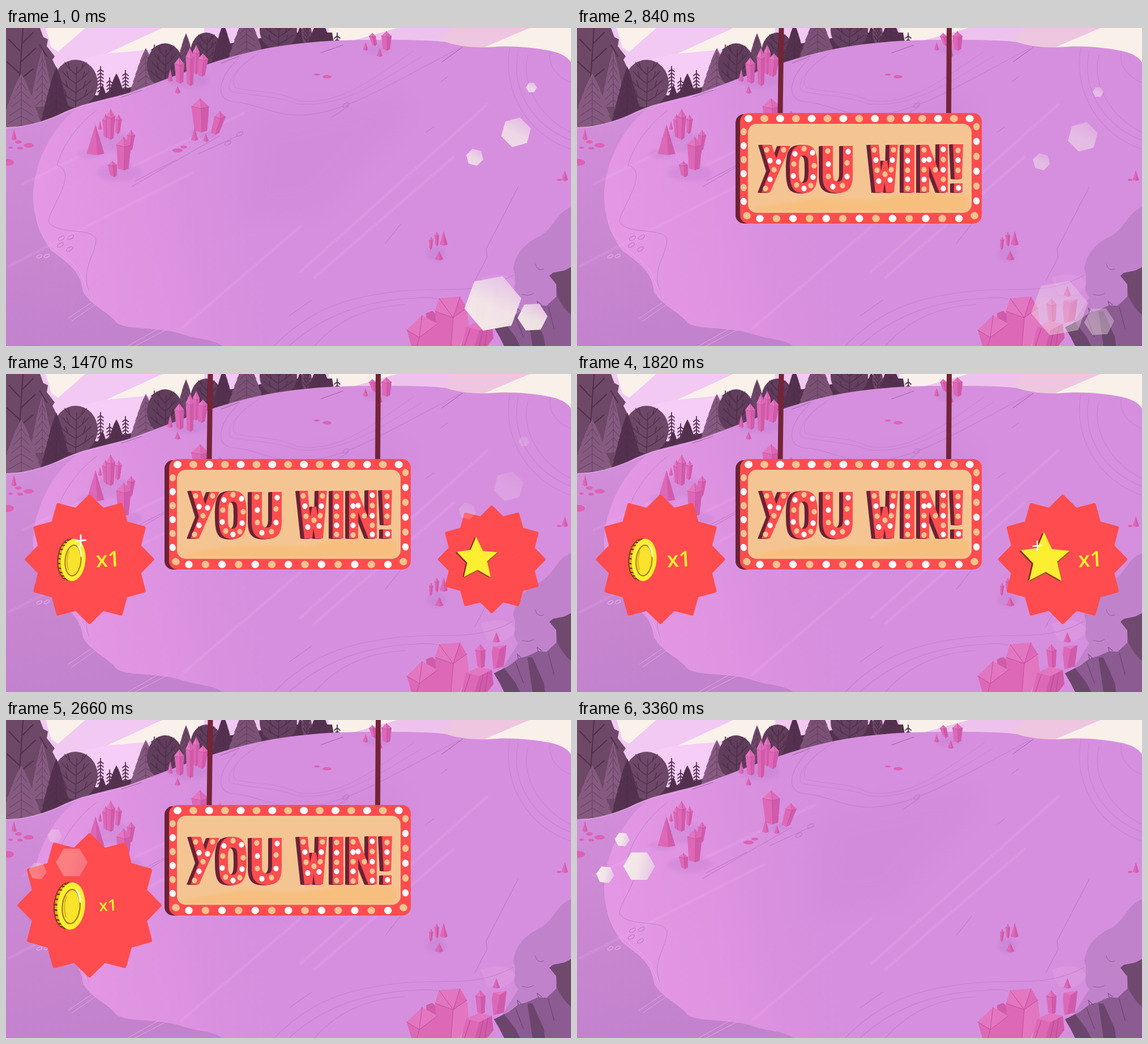
An HTML page for the animation above (3430 ms loop, 998 by 561 pixels).

```html
<!DOCTYPE html>
<html lang="en">
<head>
<meta charset="utf-8">
<title>You win!</title>
<style>
html, body { margin: 0; width: 100%; height: 100%; overflow: hidden; background: #d68fde; }
svg { display: block; width: 100vw; height: 100vh; }
.amount { font: 600 38px "Open Sans", "Noto Sans", sans-serif; fill: #fdee32; text-anchor: middle; }
</style>
</head>
<body>
<svg id="stage" viewBox="0 0 998 561" preserveAspectRatio="none"></svg>
<script>
const LOOP = 3430, STEP = 70;
const RED = '#ff4c4f', WINE = '#6c2236', TAN = '#f3c48f', YELLOW = '#fdee32';
const DARK = '#54324f', MID = '#6d4867', PALE = '#865a80', VEIN = '#4b2a47';
const PINK = '#dd68b7', ROSE = '#d05bab', BLUSH = '#e376c0';

const n = v => Math.round(v * 10) / 10;
const pts = list => list.map(p => n(p[0]) + ',' + n(p[1])).join(' ');
const poly = (list, fill, more = '') =>
  `<polygon points="${Array.isArray(list) ? pts(list) : list}" fill="${fill}" ${more}/>`;
const path = (d, fill, more = '') => `<path d="${d}" fill="${fill}" ${more}/>`;
const line = (d, color, width = 1, alpha = 1) =>
  path(d, 'none', `stroke="${color}" stroke-width="${width}" opacity="${alpha}" stroke-linecap="round" stroke-linejoin="round"`);
const oval = (x, y, rx, ry, fill, more = '') =>
  `<ellipse cx="${n(x)}" cy="${n(y)}" rx="${rx}" ry="${ry}" fill="${fill}" ${more}/>`;
const group = (id, body, more = '') => `<g id="${id}" ${more}>${body}</g>`;

// Scenery
function fir(x, top, w, base, color) {
  const tiers = 7, h = base - top, left = [], right = [];
  let veins = `M${x} ${top + 8}V${base}`;
  for (let i = 1; i <= tiers; i++) {
    const y = top + h * i / tiers, r = w / 2 * (i / tiers) ** .85;
    left.push([x - r, y], [x - r * .92, y - 1]);
    right.push([x + r, y], [x + r * .92, y - 1]);
    if (i > 1) veins += `M${n(x - r * .65)} ${n(y)}L${x} ${n(y - h * .13)}L${n(x + r * .65)} ${n(y)}`;
  }
  return poly([[x, top], ...right, ...left.reverse()], color) + line(veins, VEIN, 1.1, .45);
}

function roundTree(x, y, rx, ry, color) {
  let veins = `M${x} ${y + ry}L${x + 2} ${y - ry * .7}`;
  for (let i = 0; i < 4; i++) {
    const from = y + ry * (.75 - i * .38), reach = rx * (.8 - i * .1);
    for (const s of [-1, 1]) {
      const ex = x + s * reach, ey = from - ry * .5;
      veins += `M${x} ${n(from)}Q${n(x + s * reach * .55)} ${n(from - 8)} ${n(ex)} ${n(ey)}`;
      veins += `M${n(x + s * reach * .5)} ${n(from - ry * .19)}l${n(s * rx * .1)} ${n(-ry * .3)}`;
    }
  }
  return oval(x, y, rx, ry, color) + line(veins, VEIN, 1.5, .7);
}

function sapling(x, top, base) {
  let d = `M${x} ${top}V${base}`;
  for (let y = top + 5; y < base - 10; y += 6) d += `M${x - 5} ${y + 4}L${x} ${y}L${x + 5} ${y + 4}`;
  return line(d, DARK, 1.8);
}

// A column leaning by `lean` with a pointed top
function prism(x, top, base, w, lean = 0) {
  const h = base - top, tx = x + lean, y = top + h * .24, r = w / 2, b = w * .36;
  const low = [x + w * .06, base], mid = [tx + w * .06, y + h * .06];
  return poly([[tx, top], [tx + r, y], [x + b, base - 3], low, [x - b, base - 3], [tx - r, y]], PINK) +
    poly([mid, [tx + r, y], [x + b, base - 3], low], ROSE) +
    poly([[tx, top], mid, [tx - r, y]], BLUSH) +
    line(`M${n(tx - r)} ${n(y)}L${n(mid[0])} ${n(mid[1])}L${n(tx + r)} ${n(y)}M${tx} ${top}L${n(mid[0])} ${n(mid[1])}L${n(low[0])} ${base}`, '#bd4896', .7, .8);
}
const spike = (x, top, base, w) =>
  poly([[x, top], [x + w / 2, base - 2], [x, base], [x - w / 2, base - 2]], PINK) +
  poly([[x, top], [x + w / 2, base - 2], [x + w * .1, base]], ROSE);
const shade = (x, y, rx, ry) => oval(x, y, rx, ry, '#b573c8', 'opacity=".24" filter="url(#soft)"');

function sky() {
  return '<rect width="998" height="200" fill="#f1c9f3"/>' +
    path('M70 0H140L92 42L80 34Z', '#faf1ea') +
    path('M276 0H350V34L262 42L190 58L176 46Z', '#faf1ea') +
    path('M86 66L170 46L300 34L280 90L160 125Z', '#f5cdf6') +
    path('M570 0H692L606 24H570Z', '#faf0ea') +
    path('M692 0H800L770 34H606V24Z', '#edc3ee') +
    path('M790 0H925L830 40L760 32Z', '#eec6e0') +
    path('M925 0H998V64L900 38L840 36Z', '#f9f0e9');
}

function forest() {
  return path('M80 110L130 108L160 119L222 104L262 84L300 62L380 30L450 18L512 8H576L580 30L460 60L250 130L90 170Z', DARK) +
    path('M0 0H60L66 16L74 20L72 32L86 50L82 56L92 76L90 88L100 112L98 165L0 178Z', MID) +
    line('M30 0L24 90M24 40L5 20M26 60L52 36M24 80L2 60M28 28L48 8M26 90L48 72M60 30L72 50', VEIN, 2, .8) +
    fir(64, 38, 46, 140, PALE) + roundTree(123, 98, 39, 42, MID) +
    fir(89, 68, 58, 168, DARK) + fir(27, 80, 84, 184, PALE) +
    sapling(167, 68, 125) + sapling(183, 88, 124) + sapling(211, 75, 120) + sapling(262, 30, 55) +
    fir(170, 100, 22, 130, DARK) + fir(195, 80, 38, 130, DARK) +
    fir(247, 35, 62, 120, PALE) + fir(318, 9, 44, 84, MID) +
    roundTree(281, 66, 32, 39, '#5f3d5b') + roundTree(354, 42, 28, 34, '#5f3d5b') +
    fir(384, -8, 46, 66, DARK) + fir(425, -28, 72, 60, '#7a5175') +
    roundTree(481, 4, 33, 34, '#63405f') + fir(520, -4, 24, 34, DARK) +
    roundTree(531, 10, 9, 18, MID) + fir(554, -18, 50, 34, DARK) + sapling(585, 9, 32);
}

function hill() {
  const top = 'M0 175C40 175 66 167 95 152C140 130 180 126 222 113C300 84 370 55 450 38C510 26 570 21 640 21C700 20 765 22 778 25C795 31 820 35 850 34C890 30 930 34 960 40Q988 45 998 61';
  const lobe = 'M132 137C90 165 62 215 52 260C40 310 55 360 80 393C115 418 132 432 136 465C150 490 180 500 195 520C215 534 270 526 310 540C340 550 365 548 382 561';
  const track = '#b878c8';
  return path(top + 'V561H0Z', '#d68fde') +
    path(lobe + 'H680V23L580 25L450 40L350 70L222 115Z', 'url(#glow)') +
    path(lobe + 'H0V175C45 175 85 158 132 137Z', 'url(#shore)') +
    path('M430 160L690 110L720 150L560 330L410 340Z', '#ca82d6', 'opacity=".28" filter="url(#haze)"') +
    path('M998 316C970 328 972 348 945 366C915 380 900 398 896 425C905 448 890 460 905 475L870 530L890 561H998Z', '#c182cc') +
    path('M838 440Q885 425 900 450Q890 478 850 470Z', '#efb4e9', 'opacity=".18"') +
    line('M520 430L850 135M545 440L790 228M222 245L420 150M30 275L180 202M5 420L330 255M310 530L520 350', '#efb0ec', 5, .17) +
    line('M410 54C375 88 368 125 400 130C440 132 470 154 520 154C600 152 690 92 800 36', track, 1.2, .6) +
    line('M455 40C410 62 394 92 405 105C440 114 480 110 515 128C585 138 640 96 720 40M440 50C405 72 385 100 398 112C440 120 480 120 515 134C590 140 650 102 735 50', track, 1, .5) +
    line('M890 35C876 110 920 188 998 214M905 40C890 110 932 174 998 198M922 48C908 100 945 160 998 184M962 41C955 65 975 88 998 96', track, 1.1, .55) +
    line('M474 561C540 492 610 474 690 465C770 455 830 474 896 436M500 561C560 505 640 480 720 477Q745 474 762 478M545 561C580 520 630 492 705 488', track, 1.2, .6) +
    line('M160 145C115 180 96 220 90 242C130 255 75 320 75 342C92 367 152 350 159 373C158 405 128 425 150 474', track, 1, .75) +
    line('M222 280L325 220L378 190M228 270L300 233M340 222L410 190M828 446L850 404L848 390L905 280M500 508L540 480M670 380L697 346M575 158L605 138M768 95L780 86M742 184L756 174', '#a96abb', 1, .65) +
    line('M55 340C60 380 115 405 130 430Q138 450 152 476M110 512L150 485M116 517L158 488M215 561L270 530M228 561L282 533', '#e9b3ea', 1, .7) +
    line('M0 176C45 176 85 158 132 138C165 130 210 121 255 102', '#e4a8e6', 1.5, .7) +
    line('M556 44L595 30M770 60L806 34M380 62L412 50M204 122L240 110M935 416Q938 430 950 425M912 470Q925 474 932 468', '#84507f', 1, .7) +
    [[98, 371], [114, 369], [96, 383], [112, 390], [392, 203], [413, 187], [600, 136]].map(([x, y]) =>
      oval(x, y, 6, 3, 'none', `stroke="#b272c2" transform="rotate(-30 ${x} ${y})"`)).join('') +
    [[59, 403], [72, 402]].map(([x, y]) =>
      oval(x, y, 5, 2.4, 'none', `stroke="#e9b3ea" transform="rotate(-25 ${x} ${y})"`)).join('');
}

function stump() {
  return path('M998 422L986 428L966 432L960 437L972 452V474L955 490L940 489L920 498L905 502L888 515L862 528L872 545L880 561H998Z', '#8b5b91') +
    path('M998 422L986 428L966 432L960 437L972 452L974 474Q985 496 998 506Z', '#70496f') +
    path('M862 528L880 519L900 545L908 561H880L872 545ZM921 500L930 500L950 545L952 561H930Z', '#6c456c') +
    line('M900 508L914 545M958 492L968 530M905 502L903 494L910 501M940 489L938 482L946 488', '#5b375a', 1.2, .6);
}

function crystals() {
  const puddles = [[22, 201, 6, 3], [40, 207, 9, 4], [8, 211, 4, 2], [25, 212, 5, 2.5], [3, 237, 11, 6],
    [549, 82, 5, 1.8], [567, 86, 8, 3], [303, 216, 9, 3.4], [314, 210, 6, 2.6], [977, 268, 4, 2]];
  return shade(185, 200, 38, 18) + shade(200, 255, 40, 15) + shade(150, 222, 22, 8) + shade(322, 92, 36, 13) +
    shade(350, 186, 24, 8) + shade(760, 398, 17, 14) + shade(655, 38, 22, 8) +
    puddles.map(p => oval(...p, '#dc62b4')).join('') +
    spike(14, 178, 198, 9) + spike(166, 164, 180, 7) +
    prism(177, 152, 194, 12, -1) + prism(197, 153, 187, 11, 2) + prism(184, 143, 197, 16, 1) +
    spike(158, 170, 224, 31) + prism(218, 180, 217, 14, 3) + prism(207, 192, 251, 26, 1) + prism(190, 235, 263, 16, -2) +
    prism(335, 30, 82, 12, 1) + prism(345, 45, 86, 18, 3) + prism(307, 52, 98, 17, -1) + prism(325, 35, 102, 15) +
    spike(290, 72, 95, 9) + spike(303, 102, 116, 10) +
    prism(344, 124, 184, 31, -1) + prism(369, 147, 188, 20, 9) + spike(333, 176, 199, 12) + spike(353, 186, 201, 10) +
    prism(651, 9, 32, 12, -4) + prism(672, 6, 40, 18) + spike(635, 25, 40, 9) + spike(660, 35, 51, 10) +
    spike(987, 251, 270, 11) +
    prism(750, 369, 391, 7, 1) + prism(761, 360, 385, 8) + spike(773, 358, 384, 14) + spike(765, 393, 410, 15) +
    spike(866, 455, 474, 13) + prism(839, 477, 519, 18, -1) +
    poly('860,481 884,478 882,500 879,516 861,521 858,492', PINK) +
    poly('872,485 884,478 879,516 866,519', ROSE) + poly('860,481 884,478 872,485', BLUSH) +
    poly('742,503 753,499 770,515 768,561 745,561', ROSE) +
    poly('765,477 802,474 814,494 817,525 801,561 762,561 758,500', PINK) +
    poly('790,511 814,494 817,525 801,561 786,561', BLUSH) + poly('765,477 802,474 790,511 758,500', BLUSH) +
    line('M758 500L790 511L814 494M790 511L802 474M765 477L790 511L786 561', '#c24f9d', 1) +
    poly('735,507 762,522 766,561 716,561 708,533', PINK) + poly('708,533 730,546 762,522 735,507', BLUSH) +
    line('M708 533L730 546L762 522M730 546L735 507M730 546L726 561', '#c24f9d', 1) +
    poly('813,527 836,517 858,522 861,547 850,561 804,561', PINK) +
    poly('836,533 858,522 861,547 850,561 828,561', ROSE) + poly('813,527 836,517 858,522 836,533', BLUSH) +
    line('M820 530L810 561M843 530L836 561M851 526L846 561', '#b84593', 1);
}

// Sign
const letters = [
  'M327 206H344L352 230L360 208H377L341 290H326L341 252Z',
  'M401 206C421 206 425 220 425 248C425 277 421 291 400 291C379 291 376 277 376 248C376 220 380 206 401 206ZM400 225C392 225 392 234 392 248C392 264 392 273 400 273C409 273 409 264 409 248C409 234 409 225 400 225Z',
  'M434 208H452V256C452 266 454 271 461 271C468 271 470 266 470 256V208H487V260C487 280 481 291 460 291C440 291 434 280 434 260Z',
  'M518 206H533L537 252L541 234H548L551 254L552 206H567L560 290H546L543 272L541 290H527Z',
  'M577 206H596V290H577Z',
  'M606 206H621L640 255V205H655V290H640L622 244V290H606Z',
  'M664 205H682L680 266H667ZM666 274H681V290H666Z'
];
const bulbSpots = [
  '335,215 341,234 365,215 356,236 348,250 341,267 333,283',
  '401,213 416,220 419,243 417,263 413,278 401,283 388,277 382,261 383,240 385,222',
  '443,217 444,240 444,262 452,280 469,278 477,262 477,238 479,218',
  '525,215 528,233 530,251 533,270 544,258 553,268 555,250 557,233 559,215',
  '584,216 584,234 584,251 584,267 584,283',
  '613,284 613,267 613,250 613,233 613,215 622,232 633,250 647,283 647,267 647,250 647,232 647,214',
  '673,216 673,233 673,251 674,282'
];

function bulbs() {
  const out = [];
  const add = (x, y, r, i) => out.push(
    `<ellipse class="bulb${i & 1}" cx="${n(x)}" cy="${n(y)}" rx="${r}" ry="${r > 5 ? 6.4 : 5}" transform="rotate(${i * 25 % 30 - 15} ${n(x)} ${n(y)})"/>`);
  for (let i = 0; i < 15; i++) add(303 + i * 27.9, 159.7, 7, i);
  for (let i = 0; i < 13; i++) add(323 + i * 29.3, 336, 6.7, i);
  for (let i = 0; i < 6; i++) {
    add(294.4, 183 + i * 24.6, 5.4, i + 1);
    add(705.6, 174 + i * 26.2, 5.6, i + 1);
  }
  add(300, 331, 6.8, 1);
  add(702, 331, 6.8, 1);
  bulbSpots.forEach(row => row.split(' ').forEach((p, i) => add(...p.split(',').map(Number), 4.6, i + 1)));
  return out.join('');
}

function sign() {
  const word = letters.join('');
  const side = [-7, -5, -3].map(dx => path(word, WINE, `transform="translate(${dx} .6)"`)).join('');
  return line('M361 -420L361 0L359 152M657.5 -420L657.5 0L656.5 152', '#742437', 9) +
    `<rect x="280" y="152" width="420" height="193" rx="15" fill="${WINE}"/>` +
    `<rect x="288" y="150" width="427" height="195" rx="15" fill="${RED}"/>` +
    '<rect x="302" y="169" width="395" height="157" rx="15" fill="#f4c593"/>' +
    path('M310 318L420 300L520 304L600 290L692 294V312Q692 324 680 324H320Z', '#fbb866', 'opacity=".45" filter="url(#soft)"') +
    `<g role="img" aria-label="YOU WIN!">${side}${path(word, RED, 'fill-rule="evenodd"')}</g>` + bulbs();
}

// Prizes
function burst() {
  const p = [];
  for (let i = 0; i < 24; i++) {
    const a = i * Math.PI / 12, r = i & 1 ? 91 : 111;
    p.push([r * Math.sin(a), -r * Math.cos(a)]);
  }
  return poly(p, RED, `stroke="${RED}" stroke-width="6" stroke-linejoin="round"`);
}

function coin() {
  let ticks = '';
  for (let i = 0; i < 13; i++) {
    const a = Math.PI * (.5 + (i + .5) / 13), x = 20 * Math.cos(a), y = 36 * Math.sin(a);
    ticks += `M${n(x - 6)} ${n(y)}h7`;
  }
  return '<g transform="translate(-29 1) rotate(5)">' +
    oval(-7, 0, 21, 37, '#8a3a18') + oval(-5, 0, 21, 37, '#dfae1b') + line(ticks, '#76331a', 2.4) +
    oval(0, 0, 22, 37.5, YELLOW) +
    oval(0, 1, 14, 27, '#f9e32b', 'stroke="#a97916" stroke-width="2"') +
    line('M6 -26Q12 -20 14 -8', '#fffbd8', 3) + line('M-9 -14Q-13 2 -7 18', '#d6a51d', 1.5) + '</g>';
}

function star() {
  const shape = '-33,-48 -19,-18 12,-15 -10,4 -2,38 -30,22 -59,37 -52,7 -74,-16 -45,-20';
  return poly(shape, '#7d2b1c', 'transform="translate(-3 1)"') +
    poly(shape, '#9c6410', 'transform="translate(1 2)"') + poly(shape, YELLOW);
}

const amount = id => group(id, '<text class="amount" y="13" transform="rotate(-3)">x1</text>');
const glint = id => group(id, line('M0 -10V10M-9 1L9 -1', '#fff', 3));

// Drifting hexagons: x, y, radius, angle, opacity track
const upper = [[0, .8], [350, .8], [840, .5], [1470, .2], [1680, 0]];
const lower = [[0, .95], [350, .85], [840, .4], [1260, 0]];
const late = [[2110, 0], [2660, .32], [3360, .97]];
const hexes = [
  [928, 105, 9.5, 0, upper], [901, 184, 27, -15, upper], [828, 228, 15.5, 15, upper],
  [860, 486, 51, -10, lower], [930, 510, 26.5, -3, lower],
  [140, 226, 28, 0, late], [110, 179, 13, 5, late], [80, 241, 16, 6, late]
];
function hex(i) {
  const [, , r, turn, fade] = hexes[i], p = [];
  for (let k = 0; k < 6; k++) {
    const a = (k * 60 + turn) * Math.PI / 180;
    p.push([r * Math.cos(a), r * Math.sin(a)]);
  }
  return group('hex' + i, poly(p, fade === late ? 'url(#pearlSide)' : 'url(#pearl)'));
}

const pearlStops = '<stop offset="0" stop-color="#f5ede8"/><stop offset=".45" stop-color="#f3e8e8"/><stop offset="1" stop-color="#e6c4e6"/>';
const stage = document.getElementById('stage');
stage.innerHTML = `<defs>
<filter id="soft"><feGaussianBlur stdDeviation="3"/></filter>
<filter id="haze"><feGaussianBlur stdDeviation="22"/></filter>
<linearGradient id="glow" gradientUnits="userSpaceOnUse" x1="60" y1="260" x2="420" y2="180"><stop offset="0" stop-color="#e397e4"/><stop offset=".45" stop-color="#e195e3" stop-opacity=".75"/><stop offset="1" stop-color="#d68fde" stop-opacity="0"/></linearGradient>
<linearGradient id="shore" x1="0" y1="0" x2=".15" y2="1"><stop offset="0" stop-color="#d48edb"/><stop offset=".45" stop-color="#cb88d3"/><stop offset="1" stop-color="#c382cd"/></linearGradient>
<linearGradient id="pearl" x1=".25" y1="1" x2=".75" y2="0">${pearlStops}</linearGradient>
<linearGradient id="pearlSide" x1="0" y1=".4" x2="1" y2=".6">${pearlStops}</linearGradient>
</defs>` + sky() + forest() + hill() + stump() + crystals() + group('sign', sign()) +
  group('coin', burst() + coin()) + amount('coinText') + glint('coinGlint') +
  group('star', burst() + star()) + amount('starText') + glint('starGlint') +
  hexes.map((_, i) => hex(i)).join('');

// Motion
const byId = Object.fromEntries([...stage.querySelectorAll('g[id]')].map(g => [g.id, g]));
const smooth = u => u * u * (3 - 2 * u), linear = u => u;

function track(keys, t, ease = smooth) {
  if (t <= keys[0][0]) return keys[0][1];
  for (let i = 1; i < keys.length; i++) {
    const [t0, a] = keys[i - 1], [t1, b] = keys[i];
    if (t < t1) return a + (b - a) * ease((t - t0) / (t1 - t0));
  }
  return keys[keys.length - 1][1];
}

function place(id, x, y, scale = 1, alpha = 1) {
  const g = byId[id];
  g.setAttribute('visibility', scale > .001 && alpha > 0 ? 'visible' : 'hidden');
  g.setAttribute('transform', `translate(${n(x)} ${n(y)}) scale(${scale.toFixed(3)})`);
  g.setAttribute('opacity', alpha.toFixed(3));
}

const drop = [[0, -360], [230, 14], [350, 1.5], [490, 0], [2800, 0], [2940, 14], [3200, -360]];
const prizes = [
  { id: 'coin', x: 147.5, textX: 180, spot: [132, 294], enter: 890, leave: 2520 },
  { id: 'star', x: 858, textX: 906.5, spot: [813, 303], enter: 1310, leave: 2170 }
];
const lamps = [0, 1].map(k => stage.querySelectorAll('.bulb' + k));
let lit = -1;

function draw(t) {
  place('sign', 0, track(drop, t));
  const on = (t + 80) % 1000 < 500 ? 1 : 0;
  if (on !== lit) {
    lit = on;
    lamps.forEach((set, k) => set.forEach(b => b.setAttribute('fill', k === lit ? '#fff' : TAN)));
  }
  for (const { id, x, textX, spot, enter: a, leave: b } of prizes) {
    place(id, x, 327, track([[a, 0], [a + 230, 1.07], [a + 370, 1], [b, 1], [b + 140, 1.115], [b + 410, 0]], t));
    place(id + 'Text', textX, 327, track([[a + 145, 0], [a + 290, 1.1], [a + 370, 1], [b + 70, 1], [b + 280, 0]], t));
    place(id + 'Glint', ...spot, track([[a + 380, 0], [a + 560, 1], [a + 720, 0]], t));
  }
  hexes.forEach(([x, y, , , fade], i) =>
    place('hex' + i, x - t * .009, y + t * .0095, 1, track(fade, t, linear)));
}

function tick(now) {
  draw(Math.floor(now % LOOP / STEP) * STEP);
  requestAnimationFrame(tick);
}
draw(0);
requestAnimationFrame(tick);
</script>
</body>
</html>
```
